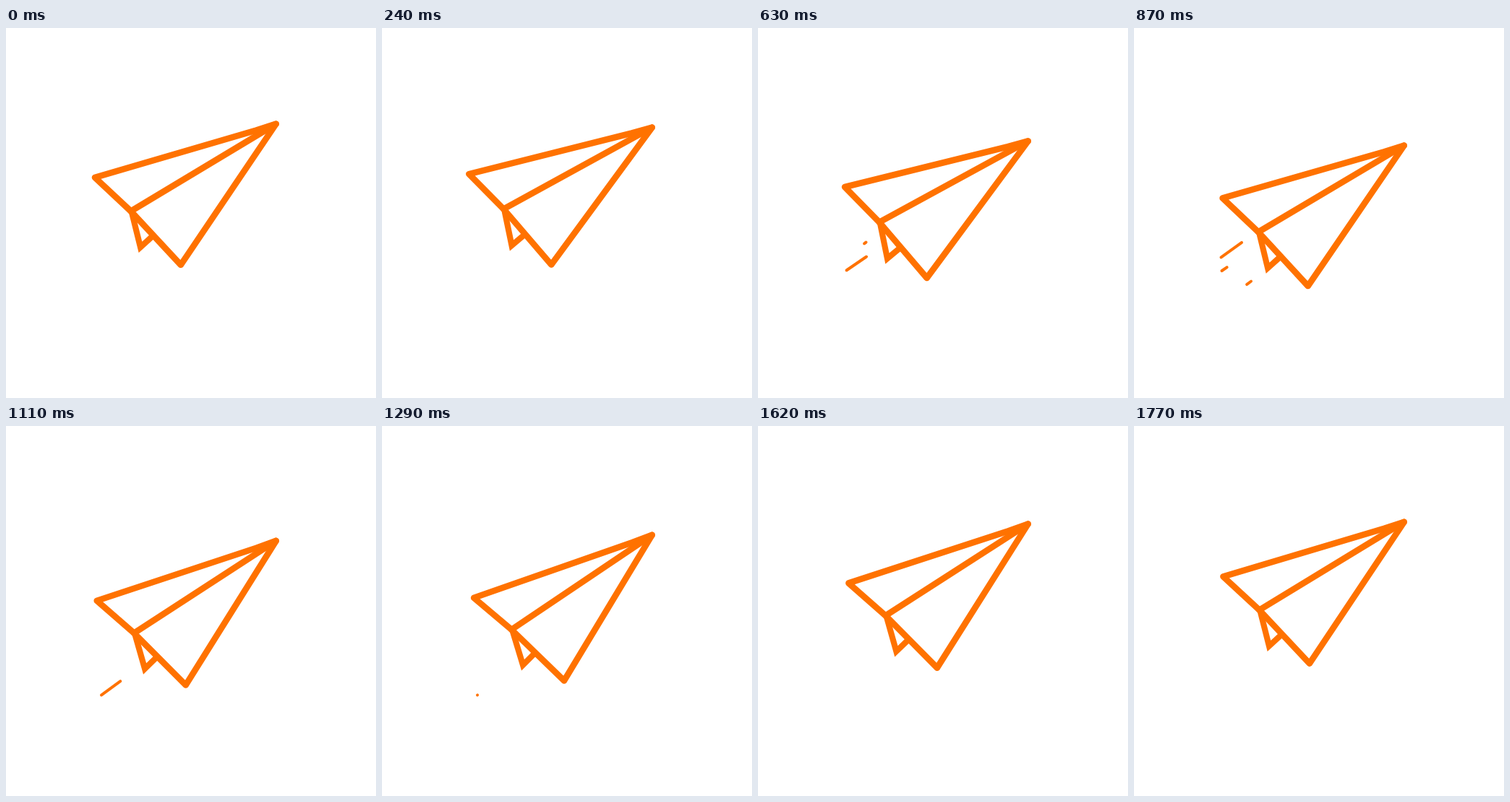
An HTML page with a canvas for the animation above (1800 ms loop, 512 px wide and 512 px high).

```html
<!DOCTYPE html>
<html lang="en">
<head>
<meta charset="utf-8">
<title>Paper plane</title>
<style>
  html, body { margin: 0; width: 100%; height: 100%; overflow: hidden; background: #fff; }
  canvas { display: block; width: 512px; height: 512px; }
</style>
</head>
<body>
<canvas id="stage" width="512" height="512"></canvas>
<script>
const ctx = document.getElementById('stage').getContext('2d');
const LOOP = 1800, STEP = 30, TRIM = 240;
const NOSE = [373.7, 132.7];

// Plane strokes in the level pose
const keel = [[174.5, 257], [186, 303.3], [203.5, 287.4]];
const wings = [[346, 141.6], [123, 206.9], [172.8, 253.5], [241.8, 327.8], NOSE];
const fold = [[172.8, 253.5], NOSE];

// Speed lines: ends, time of drawing in, time of wiping out
const trails = [
  { from: [150, 316.5], to: [121.5, 336], show: 420, hide: 710 },
  { from: [149.5, 296.5], to: [120.5, 317.3], show: 585, hide: 850 },
  { from: [162, 350.5], to: [132, 372.3], show: 800, hide: 1055 },
];

const ease = u => (1 - Math.cos(Math.PI * Math.min(1, Math.max(0, u)))) / 2;
const mix = (a, b, k) => a.map((v, i) => v + (b[i] - v) * k);

function stroke(points, width, join = 'round', closed = false) {
  ctx.lineWidth = width;
  ctx.lineJoin = join;
  ctx.lineCap = 'round';
  ctx.beginPath();
  points.forEach(p => ctx.lineTo(...p));
  if (closed) ctx.closePath();
  ctx.stroke();
}

function drawPlane(t) {
  const phase = t / LOOP * 2 * Math.PI;
  ctx.save();
  ctx.translate(NOSE[0], NOSE[1] + 15 * (1 - Math.cos(phase)));
  ctx.rotate(3 * Math.sin(phase) * Math.PI / 180);
  ctx.translate(-NOSE[0], -NOSE[1]);
  stroke(keel, 8.2, 'miter');
  stroke(wings, 8.6, 'round', true);
  stroke(fold, 8.6);
  ctx.restore();
}

function drawTrail({ from, to, show, hide }, t) {
  const head = ease((t - show) / TRIM), tail = ease((t - hide) / TRIM);
  if (head > tail) stroke([mix(from, to, tail), mix(from, to, head)], 4);
}

function frame(now) {
  const t = Math.floor(now % LOOP / STEP) * STEP;
  ctx.fillStyle = '#fff';
  ctx.fillRect(0, 0, 512, 512);
  ctx.strokeStyle = '#ff7200';
  trails.forEach(trail => drawTrail(trail, t));
  drawPlane(t);
}

let start;
function tick(now) {
  start ??= now;
  frame(now - start);
  requestAnimationFrame(tick);
}
frame(0);
requestAnimationFrame(tick);
</script>
</body>
</html>
```
